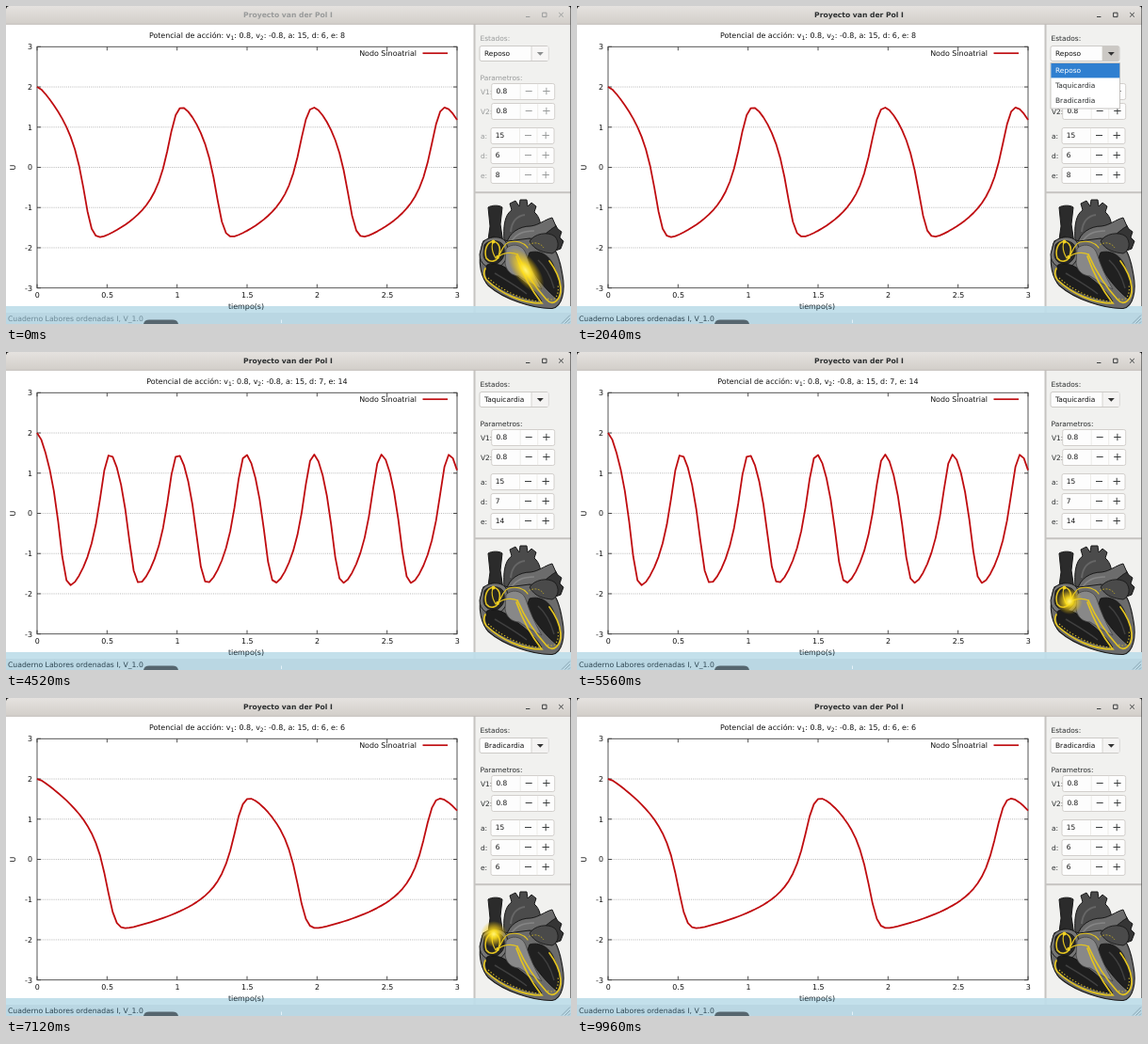
Write an HTML page that moves like this. It is 600 by 338 pixels and loops after 10000 ms.

```html
<!DOCTYPE html>
<html lang="es">
<head>
<meta charset="utf-8">
<style>
html, body { margin: 0; width: 100%; height: 100%; overflow: hidden; background: #fff; }
svg { display: block; width: 100vw; height: 100vh; }
text { font-family: "DejaVu Sans", sans-serif; white-space: pre; }
.plot text { font-size: 7.95px; fill: #111; }
.ui text { font-size: 7.45px; fill: #2a2d2e; }
.ui .value { fill: #111; }
.ui .bold { font-size: 7.62px; font-weight: bold; }
.ui .foot { font-size: 7.7px; fill: #2f4753; }
.sign { stroke: #3a3d3e; stroke-width: 1; fill: none; }
.off .sign { stroke: #9a9c9c; }
.ui.off .dim { fill: #989a9a; }
.ui.off .foot { fill: #6f8c99; }
</style>
</head>
<body>
<svg id="stage" viewBox="0 0 600 338" preserveAspectRatio="none"></svg>
<script>
const LOOP = 10000, FOCUS = 1400;
const X0 = 33, X1 = 479, Y0 = 43.3, Y1 = 299.7;
const px = t => X0 + t * (X1 - X0) / 3;
const py = u => Y1 - (u + 3) * (Y1 - Y0) / 6;

// peak: [how many maxima, time of the last one in seconds]
const states = [
  { name: 'Reposo', from: 0, d: 6, e: 8, peak: [3, 2.913], beat: -400, every: 900 },
  { name: 'Taquicardia', from: 2560, d: 7, e: 14, peak: [6, 2.946], beat: 5410, every: 700 },
  { name: 'Bradicardia', from: 6400, d: 6, e: 6, peak: [2, 2.879], beat: 7080, every: 1150 }
];
const menus = [
  { open: 1640, hover: 2300, close: 2560, first: 0 },
  { open: 5900, hover: 6150, close: 6400, first: 1 }
];

// Modified van der Pol oscillator with natural frequency e, integrated with RK4
function solve(d, e) {
  const h = 0.001, out = [];
  const acc = (x, v) => -15 * (x - 0.8) * (x + 0.8) * v - e / d * x * (x + d) * (x + e);
  let x = 2, v = 0;
  for (let i = 0; i < 4500; i++) {
    out.push(x);
    const a1 = acc(x, v);
    const v2 = v + h / 2 * a1, a2 = acc(x + h / 2 * v, v2);
    const v3 = v + h / 2 * a2, a3 = acc(x + h / 2 * v2, v3);
    const v4 = v + h * a3, a4 = acc(x + h * v3, v4);
    x += h / 6 * (v + 2 * v2 + 2 * v3 + v4);
    v += h / 6 * (a1 + 2 * a2 + 2 * a3 + a4);
  }
  return out;
}

function curve({ d, e, peak: [count, time] }) {
  const u = solve(d, e);
  const tops = [];
  for (let i = 100; i < u.length - 1; i++)
    if (u[i] > u[i - 1] && u[i] >= u[i + 1]) tops.push(i);
  const scale = tops[count - 1] ? tops[count - 1] / (time * 1000) : 1;
  let path = '';
  for (let i = 0; i <= 100; i++) {
    const t = i * 0.03;
    const k = Math.min(u.length - 1, Math.round(t * 1000 * scale));
    path += (i ? 'L' : 'M') + px(t).toFixed(2) + ' ' + py(u[k]).toFixed(2);
  }
  return path;
}

const rect = (x, y, w, h, fill, more = '') =>
  `<rect x="${x}" y="${y}" width="${w}" height="${h}" fill="${fill}" ${more}/>`;
const path = (d, fill, stroke = 'none', w = 1, more = '') =>
  `<path d="${d}" fill="${fill}" stroke="${stroke}" stroke-width="${w}" ${more}/>`;
const text = (x, y, s, more = '') => `<text x="${x}" y="${y}" ${more}>${s}</text>`;
const MID = 'text-anchor="middle"', END = 'text-anchor="end"';

function plot() {
  let s = rect(0, 19, 497, 307, '#fff');
  for (let u = -3; u <= 3; u++) {
    const y = py(u);
    if (Math.abs(u) < 3) s += path(`M${X0} ${y}H${X1}`, 'none', '#a8a8a8', 0.8, 'stroke-dasharray="1 1.2"');
    s += path(`M${X0} ${y}h4M${X1} ${y}h-4`, 'none', '#222', 0.8);
    s += text(28, y + 2.9, u, END);
  }
  for (let t = 0; t <= 3; t += 0.5) {
    s += path(`M${px(t)} ${Y0}v4M${px(t)} ${Y1}v-4`, 'none', '#222', 0.8);
    s += text(px(t) + 0.3, 310.3, t, MID);
  }
  s += rect(X0, Y0, X1 - X0, Y1 - Y0, 'none', 'stroke="#444" stroke-width=".9"');
  s += text(256, 33.8, '', `id="head" ${MID}`);
  s += text(436, 52.6, 'Nodo Sinoatrial', END);
  s += path('M442.5 50.2H469', 'none', '#bf0c10', 1.7);
  s += text(0, 0, 'U', `${MID} transform="translate(10 171.5) rotate(-90)"`);
  s += `<path id="wave" fill="none" stroke="#bf0c10" stroke-width="1.8" stroke-linejoin="round"/>`;
  return `<g class="plot">${s}</g>`;
}

function spin(label, x, y, id, value) {
  return text(504, y + 2.8, label, 'class="dim"') +
    rect(x, y - 8.3, 67, 17, '#fdfdfd', 'rx="2" stroke="#c9c6c2" stroke-width=".8"') +
    path(`M${x + 30.5} ${y - 8}v16.4M${x + 49} ${y - 8}v16.4`, 'none', '#e9e7e4', 0.8) +
    text(x + 4.7, y + 2.5, value, `id="${id}" class="value"`) +
    `<path class="sign" d="M${x + 36} ${y - 0.3}h7M${x + 54.5} ${y - 0.3}h7.4M${x + 58.2} ${y - 4}v7.4"/>`;
}

function menu() {
  let s = rect(503, 60.5, 73.5, 48.5, '#fff', 'stroke="#bab7b3" stroke-width=".8"');
  s += rect(503.4, 61, 72.8, 15.4, '#2f7fd0', 'id="pick"');
  states.forEach((st, i) => s += text(508, 71.4 + i * 15.6, st.name, `id="item${i}"`));
  return `<g id="menu">${s}</g>`;
}

function panel() {
  let s = rect(497, 19, 103, 307, '#f1f1ef');
  s += rect(496.5, 19, 2, 307, '#c6c4c1') + rect(498, 197.2, 102, 2, '#c6c4c1');
  s += text(503.5, 37, 'Estados:', 'class="dim"') + text(503.5, 79, 'Parametros:', 'class="dim"');
  s += rect(503, 42.5, 73, 16, '#fdfdfd', 'rx="2" stroke="#c2bfbb" stroke-width=".8"');
  s += rect(558, 43, 17.7, 15, '#e9e7e5', 'id="drop"') + path('M558 43v15', 'none', '#cfccc8', 0.8);
  s += path('M563.8 48.9h7l-3.5 3.8z', '#444', 'none', 1, 'id="arrow"');
  s += text(508, 53.3, '', 'id="mode" class="value"');
  s += spin('V1:', 515.7, 90.8, 'v1', '0.8') + spin('V2:', 515.7, 111.8, 'v2', '0.8');
  s += spin('a:', 515, 137.8, 'va', '15') + spin('d:', 515, 158.8, 'vd', '') + spin('e:', 515, 179.8, 've', '');
  return s;
}

function bar() {
  return rect(0, 0, 600, 19.5, 'url(#bar)', 'id="bar"') +
    path('M0 19.3H600', 'none', '#bdb9b4', 0.8) +
    text(299.5, 12.3, 'Proyecto van der Pol I', `class="bold dim" ${MID}`) +
    `<path class="sign" d="M552 11.5h4.4M569.6 7.2h4.4v4.4h-4.4zM587.2 7l4.6 4.6M591.8 7l-4.6 4.6"/>` +
    path('M0 0H3Q.5 .5 0 3zM600 0H597Q599.5 .5 600 3z', '#111') +
    path('M599.6 2V319', 'none', '#555', 0.8);
}

function foot() {
  return rect(0, 319, 600, 19, '#bfdeea', 'opacity=".93"') +
    rect(0, 326, 600, 12, '#b6d3df', 'opacity=".6"') +
    text(255, 322.3, 'tiempo(s)', `${MID} style="font-size:7.95px;fill:#1c2b33"`) +
    text(2, 335, 'Cuaderno Labores ordenadas I, V_1.0', 'class="foot"') +
    path('M146 338Q147 333.6 152 333.6H177Q182 333.6 183 338z', '#56666f') +
    path('M292.5 333.5v3.5', 'none', '#e3f2f8', 1) +
    path('M590 337.5l9-9M593.5 337.5l5.5-5.5M597 337.5l2-2', 'none', '#7d9aa7', 0.8);
}

function heart() {
  const K = '#191919', Y = '#e3c420';
  const wire = (d, w = 1.2) => path(d, 'none', Y, w, 'stroke-linecap="round"');
  let s = '';
  // great vessels
  s += path('M512 214C516 211.5 524 211.5 527 214L525 232L528 252L511 256L514 234z', '#2b2b2b', K);
  s += path('M529 250C528 236 529 222 537 217L535 210L541 207L545 213L546 206L553 206L554 213L558 209L563 213L561 219C567 224 569 233 567 242L552 252z', '#4b4b4b', K);
  s += path('M536 240C537 229 543 223 551 222', 'none', '#666', 2);
  s += path('M570 243L573 236L583 232L586 237L590 240L588 246L592 250L589 258L578 262z', '#353535', K);
  s += path('M531 254C534 240 546 234 557 234C566 233 572 227 580 225L584 234C576 238 572 246 560 247C552 248 548 254 547 262z', '#6c6c6c', K);
  s += path('M537 250C542 241 551 239 561 239', 'none', '#858585', 1.6);
  // muscle
  s += path('M507 250C501 266 502 285 512 297C529 312 560 322 580 321.5C591 320 594 302 591 286C588 268 584 258 576 250L556 247L533 250L518 245z', '#6b6b6b', K, 1.1);
  s += path('M556 250C561 242 575 239 583 245C588 251 587 260 580 263C572 262 562 261 556 250z', '#4a4a4a', K, 0.9);
  s += path('M506 252C510 245 526 243 531 251C535 261 532 274 522 278C511 280 503 274 503 264z', '#757575', K);
  s += path('M508 254C512 248 524 248 528 254C531 262 529 270 521 274C513 275 507 271 507 264z', '#262626', K, 0.8);
  // chambers
  s += path('M511 275C520 272 530 276 538 284C550 292 562 302 569 314C546 312 522 301 511 290C509 285 509 279 511 275z', '#1d1d1d', '#101010', 0.8);
  s += path('M556 262C566 259 577 264 582 277C588 290 590 304 585 311C573 302 559 284 553 270z', '#202020', '#101010', 0.8);
  s += path('M531 258C538 251 549 254 552 263C556 276 562 289 569 301C560 297 551 291 545 287C538 287 531 282 530 273z', '#888', '#444', 0.8);
  s += path('M555 254C561 250 568 252 571 257', 'none', '#b39f2a', 0.9, 'stroke-dasharray="2 1.4"');
  s += path('M519 284C529 290 543 298 553 306M565 270C573 277 579 289 582 300', 'none', '#404040', 1.5);
  // conduction wires
  s += wire('M517 250C509 252 508 262 510 268C514 273 521 272 523 266C526 258 524 251 517 250', 1.6);
  s += wire('M517 251C515 257 517 263 520 268M523 266C527 260 528 253 534 251C542 249 550 251 554 257') + wire('M522 267C528 262 537 261 543 264', 1.2);
  s += wire('M543 264C551 282 562 299 574 312C581 320 590 312 589 299C588 289 583 279 577 271', 1.7);
  s += wire('M542 266C549 286 558 302 569 316C548 316 526 306 510 291C507 287 507 283 509 279', 1.7);
  s += path('M512 289C526 302 547 312 566 314M575 311C583 315 588 307 586 296', 'none', '#cbb12a', 1.1, 'stroke-dasharray="1.5 2"');
  s += '<circle cx="517.5" cy="250.5" r="2" fill="#f0d124"/><circle cx="522" cy="267" r="1.9" fill="#f0d124"/>';
  const glow = (id, x, y, rx, ry, turn) =>
    `<ellipse id="${id}" cx="${x}" cy="${y}" rx="${rx}" ry="${ry}" fill="url(#glow)" transform="rotate(${turn} ${x} ${y})"/>`;
  s += glow('sinus', 518, 251, 14, 14, 0) + glow('node', 523, 265, 14, 14, 0) + glow('bundle', 552, 281, 28, 13, 54);
  return s;
}

const ramp = (id, type, stops) => `<${type} id="${id}" ${type[0] === 'l' ? 'x2="0" y2="1"' : ''}>` +
  stops.map(([o, c, a = 1]) => `<stop offset="${o}" stop-color="${c}" stop-opacity="${a}"/>`).join('') + `</${type}>`;

const stage = document.getElementById('stage');
stage.innerHTML = '<defs>' +
  ramp('bar', 'linearGradient', [[0, '#e5e2df'], [1, '#d2cec9']]) +
  ramp('barOff', 'linearGradient', [[0, '#f5f4f3'], [1, '#eceae8']]) +
  ramp('glow', 'radialGradient', [[0, '#fff27a'], [0.3, '#ffe01e', 0.92], [0.65, '#f2c914', 0.5], [1, '#e0b800', 0]]) +
  '</defs>' + rect(0, 0, 600, 338, '#f1f1ef') + plot() +
  `<g class="ui" id="ui">${panel()}${menu()}${bar()}${foot()}</g><g>${heart()}</g>`;

const $ = id => document.getElementById(id);
const set = (id, name, value) => $(id).setAttribute(name, value);

states.forEach(st => st.wave = curve(st));
const sub = n => `<tspan dy="1.8" font-size="6">${n}</tspan><tspan dy="-1.8">: </tspan>`;
const bump = (p, mid, half) => Math.max(0, Math.min(1, 1.6 * (1 - Math.abs(p - mid) / half)));

let shown;
function show(st) {
  if (st === shown) return;
  shown = st;
  $('head').innerHTML = `Potencial de acción: v${sub(1)}0.8, v${sub(2)}-0.8, a: 15, d: ${st.d}, e: ${st.e}`;
  set('wave', 'd', st.wave);
  $('mode').textContent = st.name;
  $('vd').textContent = st.d;
  $('ve').textContent = st.e;
}

function draw(t) {
  const st = states.filter(q => t >= q.from).pop();
  show(st);

  const off = t < FOCUS;
  set('ui', 'class', off ? 'ui off' : 'ui');
  set('bar', 'fill', off ? 'url(#barOff)' : 'url(#bar)');

  const m = menus.find(q => t >= q.open && t < q.close);
  set('menu', 'visibility', m ? 'visible' : 'hidden');
  set('drop', 'fill', m ? '#cbc8c4' : off ? '#f7f6f5' : '#f4f3f2');
  set('arrow', 'fill', off ? '#8d8f8f' : '#333');
  if (m) {
    const pick = m.first + (t >= m.hover ? 1 : 0);
    set('pick', 'y', 61 + pick * 15.6);
    states.forEach((q, i) => $('item' + i).style.fill = i === pick ? '#fff' : '');
  }

  const p = (((t - st.beat) % st.every) + st.every) % st.every;
  set('sinus', 'opacity', bump(p, 40, 100));
  set('node', 'opacity', bump(p, 155, 105));
  set('bundle', 'opacity', bump(p, 380, 110));
}

const start = performance.now();
function tick() {
  draw((performance.now() - start) % LOOP);
  requestAnimationFrame(tick);
}
draw(0);
tick();
</script>
</body>
</html>
```
